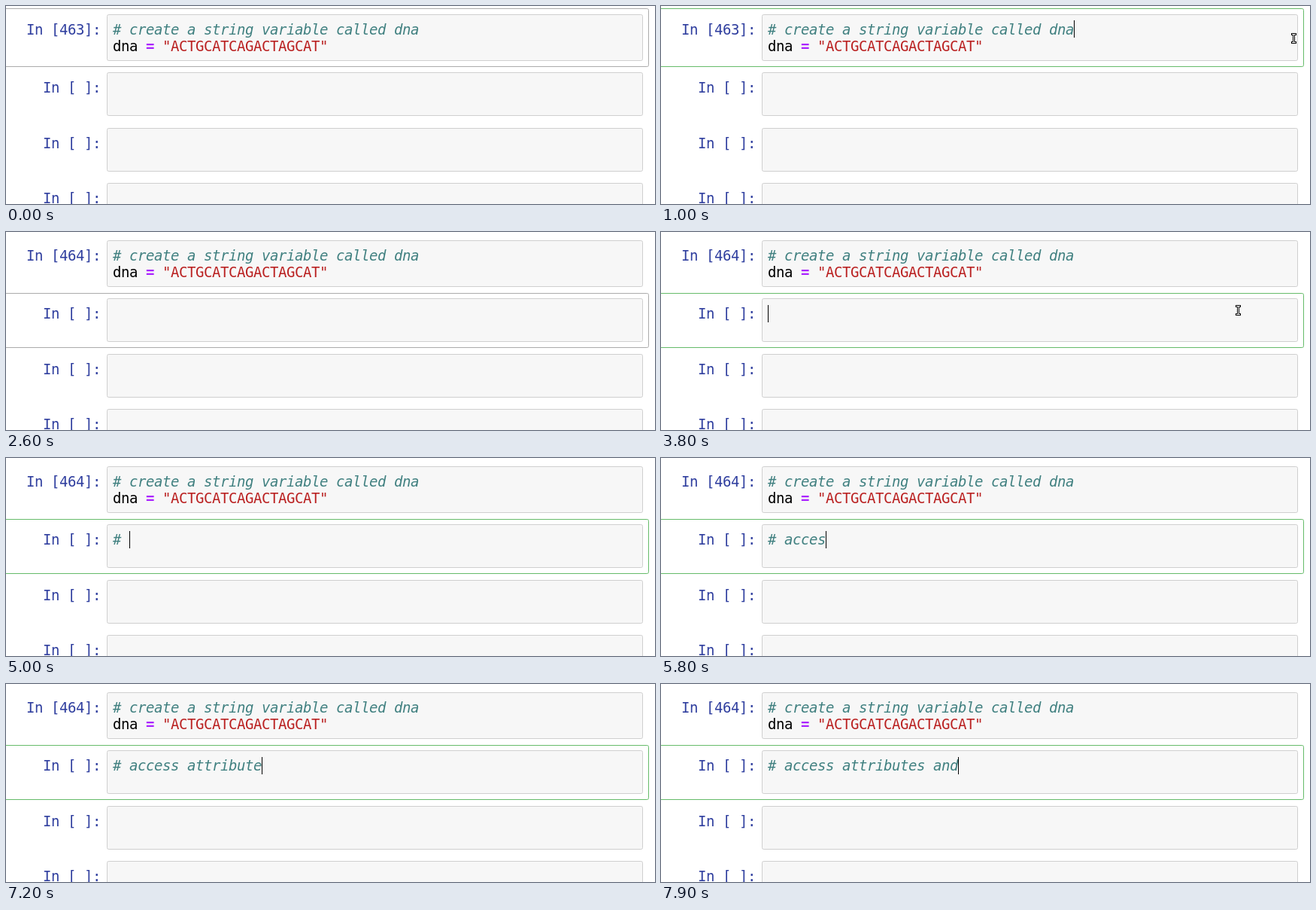
Animation, 863 px wide and 263 px high, one loop 8 s. Source, as an HTML page:

```html
<!DOCTYPE html>
<html lang="en">
<head>
<meta charset="utf-8">
<title>Notebook typing</title>
<style>
html, body { margin: 0; width: 100%; height: 100%; overflow: hidden; background: #fff; }
#stage { position: relative; width: 863px; height: 263px; overflow: hidden; }
#stage > * { position: absolute; box-sizing: border-box; }
.box { left: 134px; width: 713px; background: #f7f7f7; border: 1px solid #cfcfcf; border-radius: 2.6px; }
.line { font: 19px/22px "DejaVu Sans Mono", monospace; white-space: pre; left: 142px; color: #000; }
.prompt { left: 0; width: 126px; text-align: right; color: #303f9f; }
.note { color: #408080; font-style: italic; }
.op { color: #a2f; font-weight: bold; }
.str { color: #ba2121; }
#frame { left: -6px; width: 861px; border: 1px solid #ababab; border-radius: 2.6px; }
#caret { width: 1px; height: 23px; background: #000; }
#mouse { left: 0; top: 0; width: 7px; height: 14px; }
</style>
</head>
<body>
<div id="stage"></div>
<script>
const LOOP = 8000, TICK = 100, CHAR = 11, LEFT = 142;
const BLINK = 530, BLINK_LEAD = 45;
const RUN = 2600, FOCUS = [1000, 3800];
const NOTE = "# create a string variable called dna";

// Bursts of typing, one character per tick
const bursts = [[4200, "#"], [5000, " "], [5200, "ac"], [5500, "c"], [5700, "es"],
  [6000, "s "], [6300, "att"], [6700, "ributes"], [7600, " and"]];

// Pointer visits: it enters at one point, glides to the next in a tick, then rests
const visits = [
  { from: 500, to: 1400, path: [[856, 43], [838, 36]] },
  { from: 3500, to: 4400, path: [[798, 86], [764, 97]] },
  { from: 4400, to: 4500, path: [[838, 103], [838, 103]] },
];

const stage = document.getElementById("stage");
function add(cls, top, html = "") {
  const el = document.createElement("div");
  el.className = cls;
  el.style.top = top + "px";
  el.innerHTML = html;
  return stage.appendChild(el);
}

const frame = add("", 0);
frame.id = "frame";
const prompts = [11, 88, 162, 235].map((top, i) => {
  add("box", top).style.height = (i ? 58 : 62) + "px";
  return add("line prompt", top + 9, "In [ ]:");
});
add("line note", 20, NOTE);
add("line", 42, 'dna <span class="op">=</span> <span class="str">"ACTGCATCAGACTAGCAT"</span>');
const typed = add("line note", 97);
const caret = add("", 0);
caret.id = "caret";
stage.insertAdjacentHTML("beforeend", `<svg id="mouse" viewBox="0 0 7 14">
  <path d="M0 0H7V3H5V11H7V14H0V11H2V3H0Z"/>
  <path d="M1 1.5H6M3.5 1.5V12.5M1 12.5H6" stroke="#fff" fill="none"/></svg>`);
const mouse = document.getElementById("mouse");

// Keep the monospace grid on whole pixels
const probe = add("line", 0, "0".repeat(20));
const advance = probe.getBoundingClientRect().width / 20;
probe.remove();
for (const el of stage.querySelectorAll(".line")) el.style.letterSpacing = CHAR - advance + "px";

function typing(t) {
  let text = "", last = 0;
  for (const [start, part] of bursts) {
    if (t < start) break;
    const n = Math.min(part.length, Math.floor((t - start) / TICK) + 1);
    text += part.slice(0, n);
    last = start + (n - 1) * TICK;
  }
  return { text, last };
}

function draw(time) {
  const t = Math.floor(time / TICK) * TICK;
  const second = t >= RUN;
  const focus = FOCUS[+second];
  const editing = t >= focus;
  const { text, last } = typing(t);

  prompts[0].textContent = `In [${second ? 464 : 463}]:`;
  typed.textContent = text;

  frame.style.top = (second ? 81 : 3) + "px";
  frame.style.height = (second ? 73 : 78) + "px";
  frame.style.borderColor = editing ? "#66bb6a" : "#ababab";

  const idle = t - Math.max(focus, last) + BLINK_LEAD;
  caret.hidden = !editing || idle % (2 * BLINK) >= BLINK;
  caret.style.left = LEFT + CHAR * (second ? text : NOTE).length + "px";
  caret.style.top = (second ? 97 : 19) + "px";

  const visit = visits.find(v => t >= v.from && t < v.to);
  mouse.style.visibility = visit ? "visible" : "hidden";
  if (visit) {
    const p = Math.min(1, (t - visit.from) / TICK);
    const [x, y] = visit.path[0].map((a, i) => a + (visit.path[1][i] - a) * p);
    mouse.style.transform = `translate(${x}px, ${y}px)`;
  }
}

const start = performance.now();
function loop(now) {
  draw(Math.max(0, now - start) % LOOP);
  requestAnimationFrame(loop);
}
draw(0);
requestAnimationFrame(loop);
</script>
</body>
</html>
```
